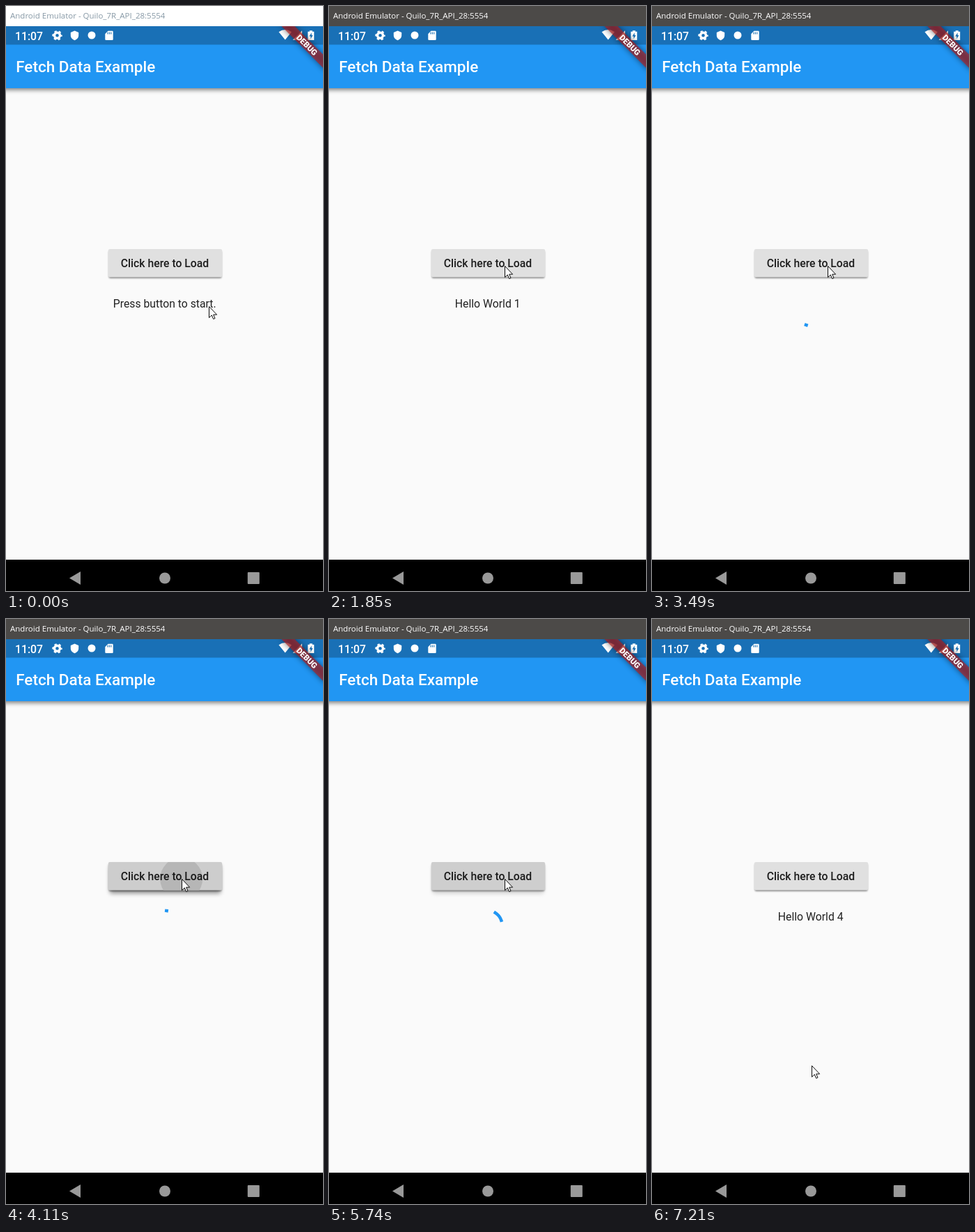
An HTML page for the animation above (7.3 s loop, 455 px wide and 840 px high).

```html
<!DOCTYPE html>
<html lang="en">
<head>
<meta charset="utf-8">
<title>Fetch Data Example</title>
<style>
  html, body { margin: 0; width: 100%; height: 100%; overflow: hidden; background: #fafafa; }
  svg { display: block; width: 455px; height: 840px; font-family: Roboto, sans-serif; }
  .medium { font-weight: 500; }
  .body { font-size: 15.75px; fill: #000; fill-opacity: .87; text-anchor: middle; }
</style>
</head>
<body>
<svg viewBox="0 0 455 840">
  <defs>
    <filter id="soft" x="-20%" y="-50%" width="140%" height="200%"><feGaussianBlur stdDeviation="1.1"/></filter>
    <filter id="wide" x="-20%" y="-50%" width="140%" height="200%"><feGaussianBlur stdDeviation="3"/></filter>
    <filter id="ribbon" x="-20%" y="-100%" width="140%" height="300%"><feGaussianBlur stdDeviation="4"/></filter>
    <clipPath id="buttonClip"><rect x="147" y="349" width="163" height="40.5" rx="2.2"/></clipPath>
    <clipPath id="screen"><rect y="29" width="455" height="766"/></clipPath>
  </defs>

  <rect width="455" height="840" fill="#fafafa"/>

  <!-- app bar -->
  <g clip-path="url(#screen)">
    <rect x="-10" y="60" width="475" height="60.5" fill="#000" opacity=".5" filter="url(#wide)"/>
  </g>
  <rect y="55" width="455" height="63" fill="#2196f3"/>
  <rect y="29" width="455" height="26.5" fill="#1970b6"/>
  <text class="medium" x="14.2" y="95.4" font-size="22.5" fill="#fff">Fetch Data Example</text>

  <!-- status bar -->
  <g fill="#fff">
    <text class="medium" x="13" y="48.5" font-size="15.75">11:07</text>
    <g transform="translate(73.5 42.3)">
      <circle r="4" fill="none" stroke="#fff" stroke-width="3.4"/>
      <circle r="6" fill="none" stroke="#fff" stroke-width="2.4" stroke-dasharray="3.14 3.14" stroke-dashoffset="1.57"/>
    </g>
    <path d="M98.5 35.5l5.7 2.5v4c0 3.4-2.3 6-5.7 7.2c-3.4-1.2-5.7-3.8-5.7-7.2v-4z"/>
    <circle cx="123" cy="42" r="5.5"/>
    <path d="M146.5 35.8h6a1.2 1.2 0 0 1 1.2 1.2v10.8a1.2 1.2 0 0 1-1.2 1.2h-9a1.2 1.2 0 0 1-1.2-1.2v-7.8z"/>
    <path d="M391.5 37.2q9.2-6.4 18.4 0l-9.2 11.3z"/>
    <path d="M411.5 48.8l13.5-13.5v13.5z"/>
    <path d="M435.7 35.2h4v1.5h2.5v12.3h-9v-12.3h2.5z"/>
  </g>
  <path d="M146 37.5v3M148.4 37.5v3M150.8 37.5v3" stroke="#1970b6" stroke-width="1.1"/>
  <path d="M438.6 38.2l-3.3 5.3h2v3.8l3.2-5.3h-1.9z" fill="#1970b6"/>

  <!-- corner ribbon -->
  <g clip-path="url(#screen)">
    <g transform="translate(459 29) rotate(45)">
      <rect x="-45" y="31.5" width="90" height="13.5" opacity=".5" filter="url(#ribbon)"/>
      <rect x="-45" y="31.5" width="90" height="13.5" fill="#b71c1c" fill-opacity=".627"/>
      <text y="42.3" font-size="11.5" font-weight="900" fill="#fff" text-anchor="middle">DEBUG</text>
    </g>
  </g>

  <!-- button -->
  <rect x="147.5" y="351" width="162" height="40" rx="2" opacity=".42" filter="url(#soft)"/>
  <rect id="lift" x="149" y="354" width="159" height="40" rx="2" filter="url(#wide)"/>
  <g clip-path="url(#buttonClip)">
    <rect x="147" y="349" width="163" height="40.5" fill="#e0e0e0"/>
    <rect id="press" x="147" y="349" width="163" height="40.5" fill="#cdcdcd"/>
    <circle id="ripple" cx="251.7" cy="373" r="30.5" fill="#b6b6b6"/>
  </g>
  <text class="body medium" x="228" y="375">Click here to Load</text>

  <text id="message" class="body" x="227.7" y="433.4"></text>
  <path id="spinner" fill="none" stroke="#2196f3" stroke-width="4.5" stroke-linecap="square"/>

  <!-- navigation bar -->
  <rect y="795" width="455" height="45"/>
  <g fill="#999">
    <path d="M91 821.5l16-9.5v19z"/>
    <circle cx="228" cy="821.5" r="8"/>
    <rect x="346.8" y="813" width="17" height="17" rx="1"/>
  </g>

  <!-- window title -->
  <rect id="titleBar" width="455" height="29"/>
  <text id="title" x="6" y="18" font-size="11.5" font-family="'Open Sans', 'Noto Sans', sans-serif">Android Emulator - Quilo_7R_API_28:5554</text>

  <circle id="flash" cx="252" cy="373" r="12" fill="#f5eb14" opacity=".65"/>
  <path id="cursor" d="M.5 .5V16.6L4.3 13L6.7 18.5L9 17.5L6.7 12.2H11.6Z" fill="#fff" stroke="#000" stroke-width=".95"/>
</svg>

<script>
const LOOP = 7300, HOLD = 150;
const el = id => document.getElementById(id);
const set = (id, attrs) => { for (const k in attrs) el(id).setAttribute(k, attrs[k]); };
const clamp = x => Math.min(1, Math.max(0, x));

// Each load: click time, end, redraw steps, spinner age when first drawn.
const loads = [
  { click: 690,  end: 1850, steps: 13, age: 18, tint: 0 },
  { click: 2400, end: 3640, steps: 14, age: 14, tint: 1 },
  { click: 3960, end: 5120, steps: 14, age: 21, tint: 1 },
  { click: 5500, end: 6690, steps: 14, age: 30, tint: 1 }
];

// Cursor positions as [from, x, y], held until the next one.
const moves = [
  [0, 291, 431], [60, 269, 396], [150, 252, 373], [7150, 244, 452], [7210, 229, 641]
];

// cubic-bezier(.4, 0, .2, 1)
function ease(x) {
  let lo = 0, hi = 1;
  for (let i = 0; i < 24; i++) {
    const s = (lo + hi) / 2, r = 1 - s;
    if (1.2 * s * r * r + .6 * s * s * r + s ** 3 < x) lo = s; else hi = s;
  }
  return lo * lo * (3 - 2 * lo);
}

function arc(age) {
  const cycle = Math.floor(age / 1000), u = age / 1000 - cycle;
  const head = ease(clamp(u * 2)), tail = ease(clamp(u * 2 - 1));
  const start = Math.PI * (-.5 + 1.5 * tail + 1.7 * u - .8 * cycle);
  const sweep = Math.max(.01, 1.5 * Math.PI * (head - tail));
  const at = a => `${228 + 20.25 * Math.cos(a)} ${439 + 20.25 * Math.sin(a)}`;
  return `M${at(start)}A20.25 20.25 0 ${sweep > Math.PI ? 1 : 0} 1 ${at(start + sweep)}`;
}

function draw(t) {
  const active = t >= loads[0].click;
  set('titleBar', { fill: active ? '#4c4a48' : '#fff' });
  set('title', { fill: active ? '#fff' : '#8799a6' });

  const [, x, y] = moves.filter(m => t >= m[0]).pop();
  set('cursor', { transform: `translate(${x} ${y})` });

  let message = 'Press button to start.', flash = false;
  let path = '', lift = 0, press = 0, ripple = 0;
  loads.forEach((load, i) => {
    const begin = load.click + HOLD;
    if (t >= load.click && t < begin) flash = true;
    if (t >= load.end) message = 'Hello World ' + (i + 1);
    else if (t >= begin) {
      const step = (load.end - begin) / load.steps;
      const n = Math.min(load.steps - 1, Math.floor((t - begin + 6) / step));
      const run = n * step;
      message = '';
      path = arc(load.age + run);
      lift = clamp(1 - run / 125);
      press = load.tint * clamp(1 - (run - 55) / 165);
      ripple = load.tint * clamp(1 - run / 60);
    }
  });
  if (el('message').textContent !== message) el('message').textContent = message;
  set('spinner', { d: path });
  set('flash', { visibility: flash ? 'visible' : 'hidden' });
  set('lift', { opacity: .42 * lift });
  set('press', { opacity: press });
  set('ripple', { opacity: ripple });
}

const origin = performance.now();
function tick() {
  draw((performance.now() - origin) % LOOP);
  requestAnimationFrame(tick);
}
tick();
</script>
</body>
</html>
```
